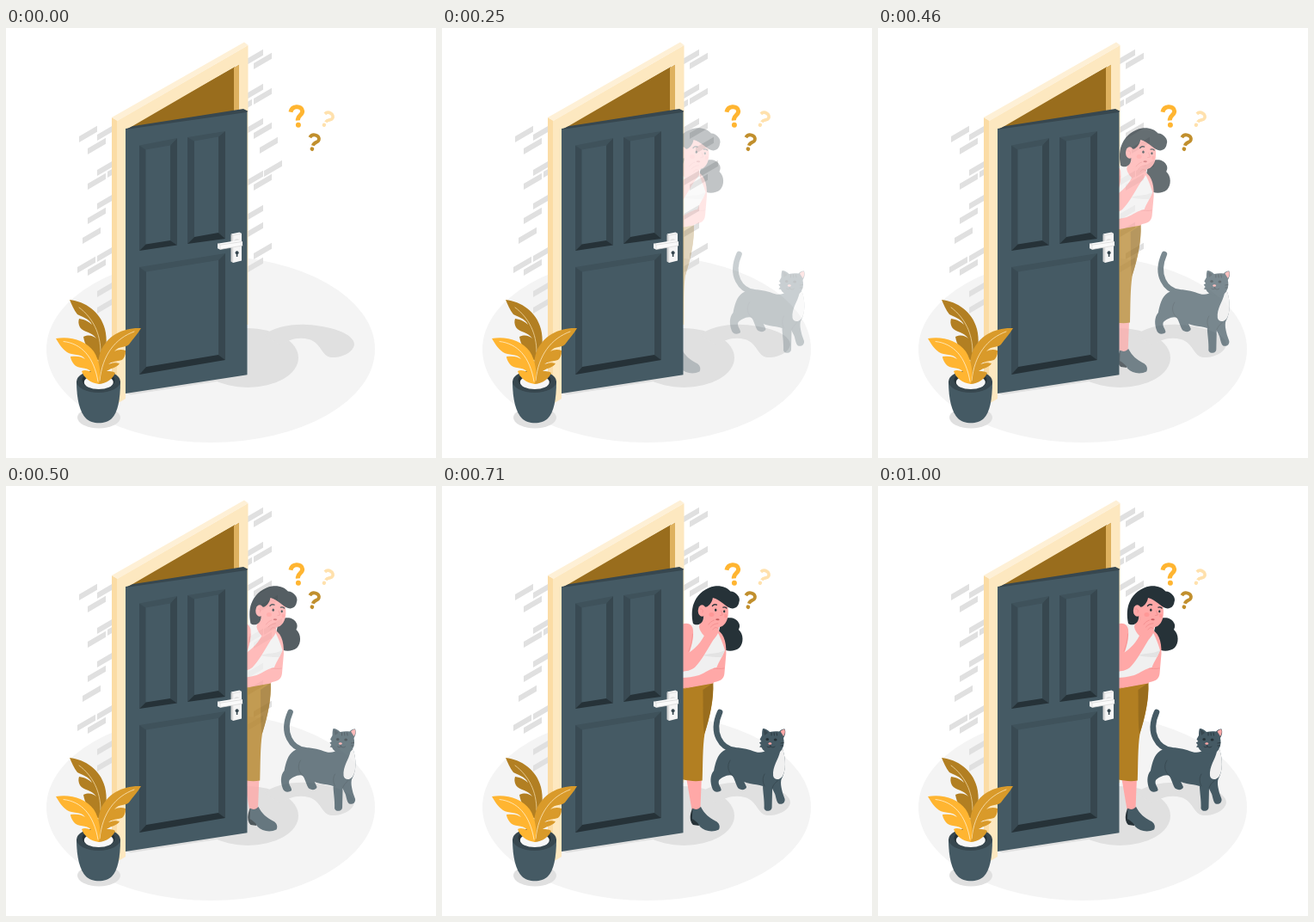
Recreate the animation shown at these times as an HTML page with a canvas. Size 500x500 px, loop 1.04 s.

```html
<!DOCTYPE html>
<html lang="en">
<head>
<meta charset="utf-8">
<title>Who is there?</title>
<style>
  html, body { margin: 0; width: 100%; height: 100%; overflow: hidden; background: #fff; }
  canvas { display: block; width: 500px; height: 500px; }
</style>
</head>
<body>
<canvas id="stage" width="500" height="500"></canvas>
<script>
const stage = document.getElementById('stage').getContext('2d');
const layer = document.createElement('canvas').getContext('2d');
layer.canvas.width = layer.canvas.height = 500;
let c = stage;

const SLATE = '#455a64', DEEP = '#37474f', INK = '#263238';
const SKIN = '#ffa8a7', BLUSH = '#f28f8f', SHADE = '#e0e0e0';
const GOLD = '#ffb531', OCHRE = '#b27f22', BROWN = '#996d1d';

function fill(d, color) {
  c.fillStyle = color;
  c.fill(new Path2D(d));
}

function line(d, color, width, cap = 'round') {
  c.strokeStyle = color;
  c.lineWidth = width;
  c.lineCap = cap;
  c.lineJoin = 'round';
  c.stroke(new Path2D(d));
}

function oval(x, y, rx, ry, color) {
  c.fillStyle = color;
  c.beginPath();
  c.ellipse(x, y, rx, ry, 0, 0, Math.PI * 2);
  c.fill();
}

function brick(x, y) {
  fill(`M${x} ${y}l21 -12.2v7l-21 12.2z`, SHADE);
}

function wall() {
  [[85, 126], [106, 124], [95, 140], [106, 165], [118, 167], [95, 181], [106, 204],
   [95, 221], [89, 244], [83, 278], [106, 265], [95, 281], [106, 306], [106, 325],
   [278, 37], [288, 41], [278, 77], [288, 82], [265, 95], [278, 117], [288, 122],
   [295, 139], [278, 178], [300, 166], [288, 182], [278, 218], [278, 238],
   [288, 262], [278, 279]].forEach(([x, y]) => brick(x, y));
}

function ground() {
  oval(238, 373.5, 191, 108.5, '#f4f4f4');
  oval(281, 383.5, 59, 34.5, SHADE);
  fill('M300 357C312 348 330 344 350 345C375 346 405 355 405 368C404 377 390 384 378 383C366 381 367 366 352 362C340 359 328 362 320 369Z', SHADE);
  oval(108, 453, 25, 12.5, SHADE);
  fill('M139 424L281 403L268 407.5L145 426.5Z', SHADE);
}

function frame() {
  fill('M139 117L266 45V99L139 119Z', BROWN);
  fill('M265 46L271.5 42V98H265Z', '#deb15f');
  fill('M123 104L130 108V437L123 434Z', '#fbdca5');
  fill('M129 108L281.5 20V345H277V97H271V42L139 118.8V431L129 437Z', '#fde8c0');
  fill('M123 104L277 16.5L281.5 20L129.5 108Z', '#fef0d6');
}

// Sunken panel: [left, right, top-left, top-right, bottom-right, bottom-left] for outer and inner edge
function panel([l, r, a, b, d, e], [L, R, A, B, D, E]) {
  fill(`M${l} ${a}L${r} ${b}L${R} ${B}L${L} ${A}Z`, '#3f525b');
  fill(`M${l} ${a}L${L} ${A}V${E}L${l} ${e}Z`, '#394a53');
  fill(`M${r} ${b}L${R} ${B}V${D}L${r} ${d}Z`, DEEP);
  fill(`M${l} ${e}L${L} ${E}L${R} ${D}L${r} ${d}Z`, INK);
}

function handle() {
  fill('M261.5 240L264 241V273L261.5 271.5Z', '#d5d5d5');
  fill('M261.5 239.5L271.5 237.5L274 239V270.5L264 273L263.5 241Z', '#f5f5f5');
  line('M263.8 272V241.2L273.5 239.2', '#dcdcdc', 0.7);
  oval(268.5, 249.5, 3.6, 4.2, SHADE);
  fill('M246 250.7L272 246.5L275 248.4V253L249 257.5L246 256.2Z', '#fafafa');
  line('M246.4 251L249 252.2V257M249 252.2L274.5 248.5M249 257.5L275 253', '#d5d5d5', 0.7);
  oval(268.6, 261.3, 2, 2.1, DEEP);
  line('M268.6 262V266', DEEP, 1.6, 'butt');
}

function door() {
  fill('M139 117L280.5 96.5V403.3L139 425Z', SLATE);
  fill('M139 118L147 114.3L276 94L281 96.5L280 98Z', DEEP);
  panel([155, 199, 136.5, 128, 252.5, 259], [162.5, 191, 141.5, 136.5, 247, 251.5]);
  panel([211, 255, 127, 120, 245, 251], [219, 247, 131.5, 126.5, 238, 243]);
  panel([155, 255, 278, 262, 386, 403], [163, 247, 283.5, 270, 380, 394]);
  handle();
}

function plant() {
  fill('M82 411C82 432 86 447 93 454C100 461 116 461 123 454C130 447 133 432 133 411Z', SLATE);
  oval(107.5, 411, 25.5, 13, DEEP);
  oval(107.5, 409.5, 19, 10.5, INK);
  oval(107.8, 412, 17, 8, '#f7f7f7');
  fill('M74 316C92 318 110 330 115 350C118 362 117 375 112 388L104 385C96 377 91 366 90 359C97 356 101 358 105 361C100 353 90 354 86 348C84 344 84 341 85 338C92 339 97 342 100 345C96 337 88 336 83 333C79 328 76 321 74 316Z', OCHRE);
  line('M85 325C101 337 110 355 110 377', '#f0d7a2', 0.8);
  fill('M157 349C137 348 118 357 110 376C106 388 105 402 107 414C117 414 125 407 127 401C124 399 120 399 117 399C123 395 129 395 132 390C126 388 122 390 119 391C125 386 133 388 136 385C139 381 139 378 139 375C134 373 130 374 126 376C132 369 139 372 143 368C148 361 153 356 157 349Z', '#d99a2a');
  line('M149 353C127 361 112 380 109 410', '#fbe6bb', 0.8);
  fill('M58 361C74 358 93 363 102 376C109 387 111 402 108 414C98 413 90 406 88 399C91 397 95 398 99 400C94 393 83 397 79 391C76 387 75 384 75 382C83 381 88 382 92 385C87 378 77 381 71 377C65 373 61 366 58 361Z', GOLD);
  line('M67 364.5C88 367 102 382 107 411', '#fff0cf', 0.8);
}

function query(x, y, deg, size, color) {
  c.save();
  c.translate(x, y);
  c.rotate(deg * Math.PI / 180);
  c.scale(size, size);
  line('M-7 -5.2C-6 -9 -3 -10.6 0.2 -10.6C4 -10.6 6.7 -8.4 6.7 -5C6.7 -0.6 0.5 -0.6 0.5 5.2', color, 5, 'butt');
  oval(0.6, 10.5, 3, 3, color);
  c.restore();
}

function woman() {
  fill('M326 155C333 152 341 153 344 159C346 162 345 165 344 167C350 172 350 183 345 188C339 193 329 193 324 188C319 181 320 164 326 155Z', INK);
  // folded arm, shirt and neck
  fill('M316 166C326 169 330 180 329.5 195L327.5 218C327 224 323 227 316 228L278 236V220L318 209L322 196Z', SKIN);
  line('M327 212C323 213 318 212 315 212', BLUSH, 0.8);
  fill('M283 162C292 159 304 162 316 164.5C321 171 325 181 328 191C325 199 321 204 318.5 211C311 212 306 217 298 220C291 222 284 223 278 223V170Z', '#f0f0f0');
  fill('M328 191C318 196 309 194 303 197C312 199 319 199 324.5 199Z', '#e3e3e3');
  fill('M300 154L314 160L316 176C308 179 300 173 298 164Z', SKIN);
  // trousers and leg
  fill('M283 338H301L299.5 376H289.5Z', SKIN);
  fill('M278 235.5L314.3 228.8C315.5 246 311 268 304.5 288C302 304 302.5 324 301.8 342.5C294 344 287 343 278 341Z', OCHRE);
  fill('M302.5 237L314.3 229C314.8 250 310.5 268 304 289C302 272 303 255 302.5 237Z', BROWN);
  fill('M300 230L318 226L314 229.5L278 236Z', SKIN);
  // boot
  fill('M290 375L295 378L298 388V395L291 394C288 391 287 386 288.5 380Z', INK);
  fill('M290.5 374.5C294 377 297 376 300 373C304 381 310 386 317 389.5C321.5 391.5 323 396 321 399.5C314 403 304 401.5 299 396C297 391 293 389 290 387Z', SLATE);
  // raised arm
  fill('M278 161C285 158 290 161 291 167C292 177 289 187 286 196L278 202Z', SKIN);
  line('M290.5 172C290 181 288 187 286 192', BLUSH, 0.7);
  // head
  fill('M302 132C312 122 330 128 331.5 141C333 150 331 159 325 163C316 167 305 160 301 152Z', SKIN);
  fill('M291 160C289 150 289.5 141 293 134C297 125 306 118 316 116.4C324 115.5 331 118 334.5 122.5C341 122.5 347 130 344.5 135C344 140.5 339 143.5 334.5 142C328 140 323 132 314 130C313 136 309 141 304 141L303 154C302 161 295 163 291 160Z', INK);
  oval(301.5, 145, 4.7, 6.8, SKIN);
  line('M299.5 143C302 142 303 145 302 147', BLUSH, 0.8);
  oval(317.3, 144.2, 1.2, 1.6, INK);
  oval(327.3, 145.7, 1.1, 1.5, INK);
  line('M313.5 139.5C315 137.5 317 137.5 318.5 138.2M326 141.2C327.5 140.6 329 141 330 142', INK, 1.3);
  line('M323.5 145L325.3 150L322.5 150.5', BLUSH, 0.9);
  oval(329, 151, 1.8, 2.3, '#ff9897');
  oval(312.5, 149.5, 3, 2.5, '#ff9897');
  oval(319.5, 155.3, 2.2, 1.1, '#c95d60');
  // forearm and hand
  fill('M278 198C289 194 299 184 304 174C304 165 306 158 311 154.5C314 152.5 317 153.5 315.5 156C319 155.5 322 157 320.5 159.5C323 161 322 164 320.5 166C322 170 318 175 314.5 179C307 191 301 203 293 211C288 215 283 215 278 216Z', SKIN);
  line('M309 161C311 158 313 157 315.5 156M311.5 164C314 161 317 160 320 159.8M314 167C316 164 318 164 320.5 166', BLUSH, 0.9);
}

function cat() {
  line('M341 307C326 305 313 288 324 263', SLATE, 6.6);
  // far legs
  fill('M335 326L353 334C349 340 353 345 355 350C354 354 348 354 345 351C342 346 341 338 336 334Z', SLATE);
  fill('M384 335L397 337C393 344 396 352 397 357L399.5 364C400 369 396 370.5 392.5 369.5C389.5 367 389.5 362 388 358L383 348Z', SLATE);
  fill('M328 308C338 301 355 305 365 309C372 311 375 309 379 307L397 306C401 318 401 331 396 340C392 344 387 346 385 351L384.5 373C385 378.5 377 379.5 375.5 375C376 365 374 356 374 349C365 346 353 347 343 339C336 333 327 338 323 342C321 347 326 350 325.5 354C322 357 316 356 315 351C313 345 312 337 317 331C319 321 321 313 328 308Z', SLATE);
  fill('M397 305.5C401 318 401 331 396.5 338C393 342.5 387 342 386 337C385 326 392 318 394 309Z', '#f0f0f0');
  line('M339 337C333 332 332 325 336 319M376 349C373 343 374 338 376 335M385 351C386 348 388 345 391 343', DEEP, 0.8);
  // head
  fill('M373 290C373 287 373 284 374 282C377 282 380 284 382 286C386 285 390 285 393 285.5C395 283 398 282 399.5 282.5C401 286 400 290 398 293C400 303 396 310 387 311C380 312 374 308 372.5 304L370 303.5L371.8 301L369.8 298.5L372.3 297L370.5 294.5Z', SLATE);
  fill('M394.5 285.5C396 283.5 398 283 399.3 283.3C400.3 286 399.5 289 398 291Z', SKIN);
  fill('M374.8 283.5C377 284 379 285.5 380 287L376 290Z', DEEP);
  line('M384 287V290M387 286.7L387.3 290M390 287L390.5 290M395 299L398 298.5M395 302L397.5 302', INK, 0.8);
  oval(379.2, 294.6, 1.8, 1.5, INK);
  oval(388.6, 295, 1.9, 1.5, INK);
  oval(382.3, 299.6, 1.9, 1.3, SKIN);
  line('M382.5 301L383 303C385 304.5 387 304 388 303M383 303C381.5 304 380 304 379 303', INK, 0.7);
}

// Ease with a slight overshoot: cubic-bezier(.36, -.01, .5, 1.38)
function ease(x) {
  const curve = (t, a, b) => 3 * a * t * (1 - t) ** 2 + 3 * b * t * t * (1 - t) + t ** 3;
  let lo = 0, hi = 1;
  for (let i = 0; i < 30; i++) {
    const mid = (lo + hi) / 2;
    if (curve(mid, 0.36, 0.5) < x) lo = mid; else hi = mid;
  }
  return curve(hi, -0.01, 1.38);
}

const LOOP = 1040, STEPS = 25, SLIDE = 30;

// 24 steps a second, each start rounded to 10 ms
function stepAt(ms) {
  let k = STEPS - 1;
  while (k > 0 && Math.round(k * 25 / 6) * 10 > ms) k--;
  return k;
}

function slide(draw, dx) {
  c.save();
  c.translate(dx, 0);
  draw();
  c.restore();
}

function visitors(step) {
  if (step < 2) return;
  const p = step === STEPS - 1 ? 1 : ease((step + 1) / STEPS);
  c = layer;
  c.clearRect(0, 0, 500, 500);
  slide(woman, -SLIDE * (1 - p));
  slide(cat, SLIDE * (1 - p));
  c = stage;
  c.globalAlpha = Math.min(1, p);
  c.drawImage(layer.canvas, 0, 0);
  c.globalAlpha = 1;
}

const start = performance.now();

function render() {
  const step = stepAt((performance.now() - start) % LOOP);
  c.fillStyle = '#fff';
  c.fillRect(0, 0, 500, 500);
  ground();
  wall();
  frame();
  visitors(step);
  door();
  plant();
  query(338.4, 102.3, -5, 1, GOLD);
  query(373.4, 105.8, 30, 0.74, '#ffe1ad');
  query(357.6, 132.6, 15, 0.79, '#c18f2d');
  requestAnimationFrame(render);
}
render();
</script>
</body>
</html>
```
